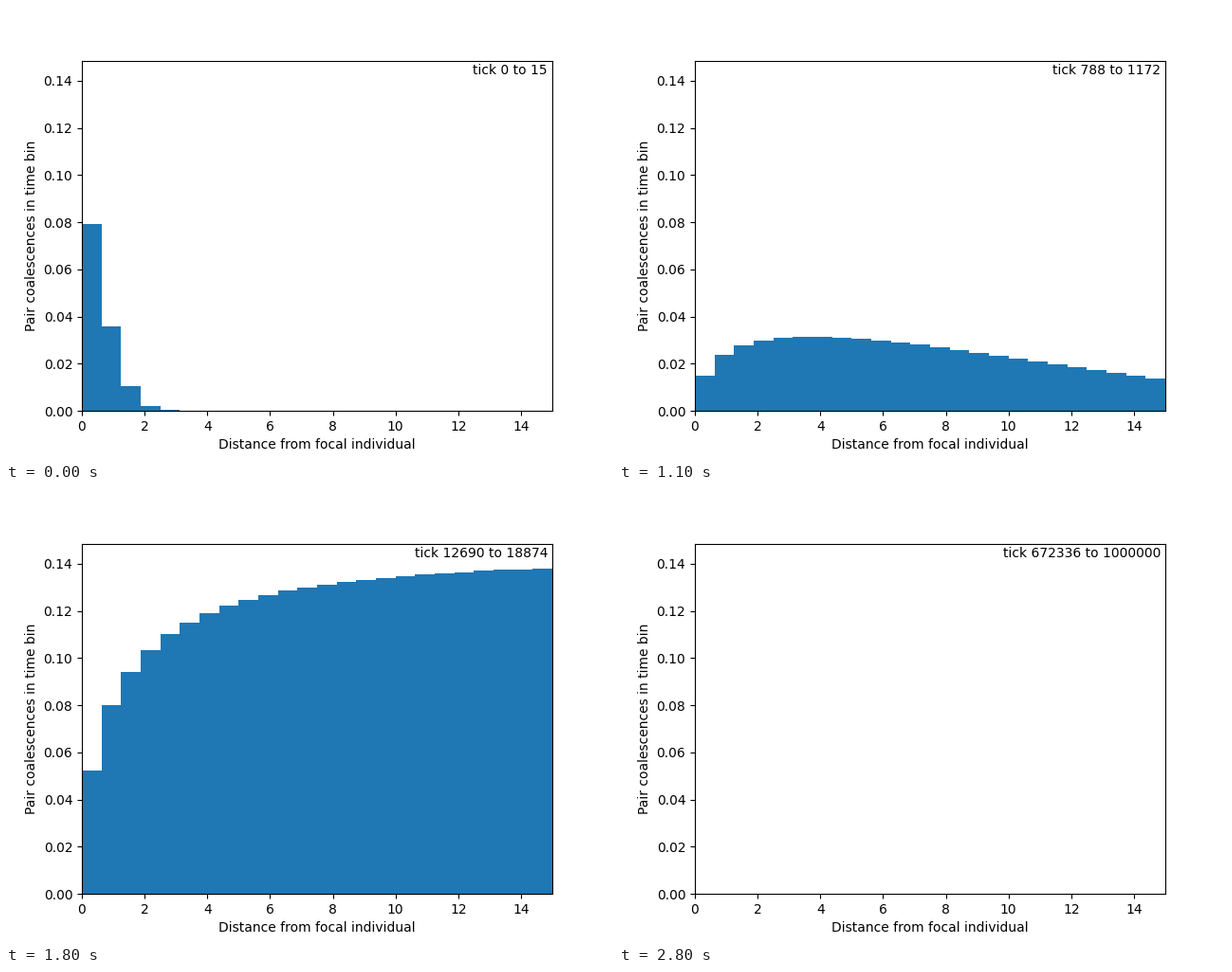
A matplotlib script that plays this animation: 640 by 480 pixels, repeating every 2.9 s.

```python
import numpy as np
import matplotlib.pyplot as plt
from matplotlib.animation import FuncAnimation

FRAMES = 29
BINS = 24
WIDTH = 15 / BINS
EDGES = np.arange(BINS) * WIDTH
MID = EDGES + WIDTH / 2

# Time windows, evenly spaced on a log scale
TICKS = np.logspace(1, 6, FRAMES + 1)
TICKS[0] = 0
LIFETIME = 22400
MIXED = 13  # step from which pairs are spread over the whole range


def amplitude(step):
    """Far-field height: eased early on, exponential decay once mixed."""
    if step < MIXED:
        return np.interp(step, [0, 5, 9, MIXED], [0.0937, 0.051, 0.0338, 0.038])
    start, end = np.exp(-TICKS[step:step + 2] / LIFETIME)
    return np.interp(step, [MIXED, 17], [1.1, 1.035]) * (start - end)


def falloff(step):
    """Bell curve over distance that widens geometrically with time."""
    reach = np.exp(np.interp(step, [0, 5, 9, 12, MIXED],
                             np.log([0.96, 3.2, 7.8, 21, 1000])))
    power = np.interp(step, [0, 5], [1.6, 2])
    return np.exp(-(MID / reach) ** power)


def depletion(step):
    """Share of nearby pairs that have not coalesced before."""
    length = np.interp(step, [0, 5, 9, 13, 18], [0.05, 0.35, 0.73, 0.9, 1.32])
    power = np.interp(step, [5, 9, 13, 18], [1, 0.64, 0.64, 0.54])
    return 1 - np.exp(-(MID / length) ** power)


def heights(step):
    return amplitude(step) * falloff(step) * depletion(step)


fig, ax = plt.subplots(figsize=(6.4, 4.8), dpi=100)
bars = ax.bar(EDGES, heights(0), width=WIDTH, align="edge", color="#1f77b4")
label = ax.text(0.99, 0.99, "", transform=ax.transAxes, ha="right", va="top")
ax.set_xlim(0, 15)
ax.set_ylim(0, 0.1486)
ax.set_xlabel("Distance from focal individual")
ax.set_ylabel("Pair coalescences in time bin")


def update(step):
    for bar, h in zip(bars, heights(step)):
        bar.set_height(h)
    label.set_text(f"tick {TICKS[step]:.0f} to {TICKS[step + 1]:.0f}")
    return [*bars, label]


anim = FuncAnimation(fig, update, frames=FRAMES, interval=100, repeat=True,
                     repeat_delay=0, blit=False)
plt.show()
```
